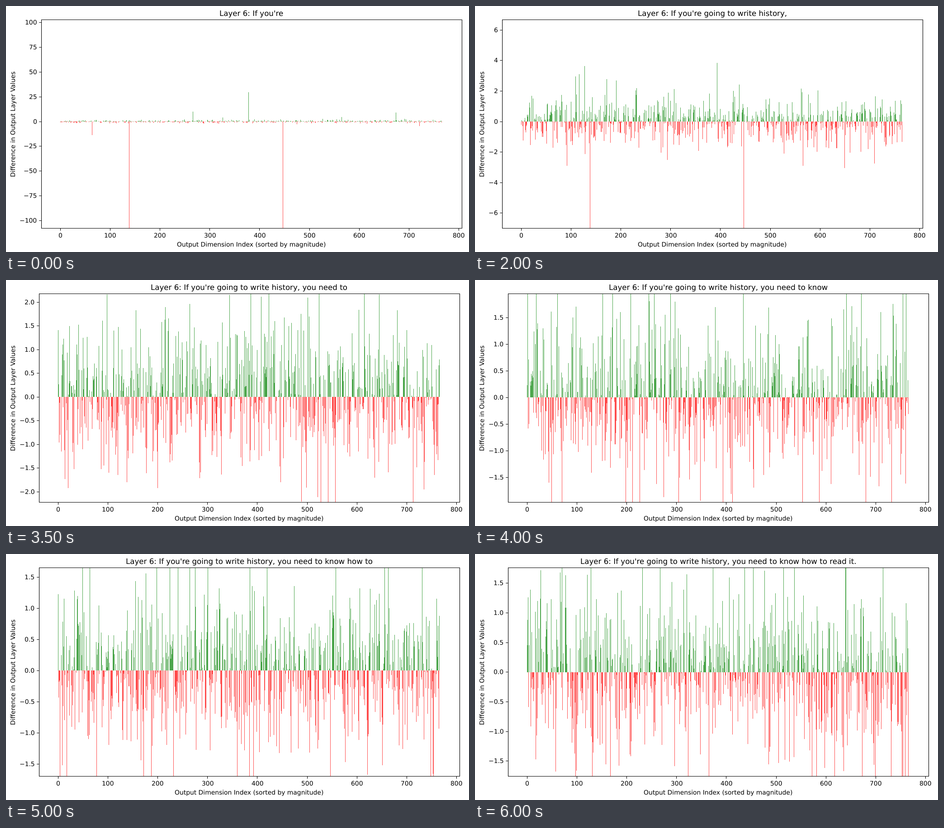
Animation of 1024x545 px, one loop 6500 ms. Source, as an HTML page:

```html
<!DOCTYPE html>
<html lang="en">
<head>
<meta charset="utf-8">
<title>Layer differences</title>
<style>
html, body { margin: 0; width: 100%; height: 100%; overflow: hidden; background: #fff; }
svg { display: block; }
text { font-family: "DejaVu Sans", sans-serif; fill: #000; text-rendering: geometricPrecision; }
.bars { shape-rendering: crispEdges; }
.axes { fill: none; stroke: #000; stroke-width: 1.11; }
</style>
</head>
<body>
<svg id="plot" width="1024" height="545" viewBox="0 0 1024 545"></svg>
<script>
const svg = document.getElementById('plot');
const TOP = 30, BOTTOM = 492, WIDTH = 930;
const COUNT = 768, UNIT = 1.1011, BAR = 0.4, OFF = 9999;
const SMALL = 13.889, LARGE = 16.667, STEP_MS = 500;
const GREEN = '#4ca64c', RED = '#ff4c4c', GREY = '#7b7b7b';

// Dimensions that stand out at first and halve with every word
const SPIKES = { 64: -13.5, 138: -230, 266: 10, 326: 4, 378: 29.5, 447: -230, 565: 4.5, 674: 9, 721: -4.5 };

const pen = document.createElement('canvas').getContext('2d');
pen.font = '1000px "DejaVu Sans", sans-serif';
const textWidth = (text, size) => pen.measureText(text).width * size / 1000;

function el(tag, attrs, parent) {
  const node = document.createElementNS('http://www.w3.org/2000/svg', tag);
  for (const key in attrs) node.setAttribute(key, attrs[key]);
  parent.appendChild(node);
  return node;
}

// Text starts on a whole pixel; align is 0.5 for centred, 1 for right
function label(parent, text, x, y, align = 0.5, size = SMALL) {
  const left = Math.round(x - textWidth(text, size) * align);
  el('text', { x: left, y, 'font-size': size }, parent).textContent = text;
}

function randomFrom(seed) {
  return () => {
    seed = (seed + 0x6D2B79F5) | 0;
    let r = Math.imul(seed ^ (seed >>> 15), 1 | seed);
    r = (r + Math.imul(r ^ (r >>> 7), 61 | r)) ^ r;
    return ((r ^ (r >>> 14)) >>> 0) / 4294967296;
  };
}

function makeValues(n, sigma, { peaks = {}, up = [], down = [] }) {
  const rnd = randomFrom(n * 97 + 11);
  const values = Array.from({ length: COUNT }, (_, i) => {
    const normal = Math.sqrt(-2 * Math.log(1 - rnd())) * Math.cos(2 * Math.PI * rnd());
    const noise = sigma * normal * (0.65 + 0.65 * rnd());
    const spike = (SPIKES[i] || 0) / 2 ** n;
    return Math.abs(spike) > Math.abs(noise) ? spike : noise;
  });
  Object.assign(values, peaks);
  up.forEach(i => values[i] = OFF);
  down.forEach(i => values[i] = -OFF);
  return values;
}

// Smallest round step giving at most nine intervals
function tickStep(range) {
  const power = 10 ** Math.floor(Math.log10(range / 9));
  return [1, 2, 2.5, 5, 10].map(m => m * power).find(step => range / step <= 9);
}

function yTicks(zero, scale) {
  const step = tickStep((BOTTOM - TOP) / scale), ticks = [];
  const first = Math.ceil((zero - BOTTOM) / scale / step);
  const last = Math.floor((zero - TOP) / scale / step);
  for (let n = first; n <= last; n++) {
    const size = Math.abs(n * step).toFixed(step < 1 ? 1 : 0);
    ticks.push({ y: Math.floor(zero - n * step * scale), text: (n < 0 ? '\u2212' : '') + size });
  }
  return ticks;
}

function drawBars(g, values, x0, zero, scale, lowColor) {
  const paths = {};
  const clampY = y => Math.max(TOP, Math.min(BOTTOM, Math.round(y)));
  const base = clampY(zero);
  values.forEach((v, i) => {
    // Edges snap to pixels, so some bars vanish
    const a = Math.round(x0 + UNIT * (i - BAR));
    const b = Math.round(x0 + UNIT * (i + BAR));
    const y = clampY(zero - v * scale);
    if (a === b || y === base) return;
    const color = v > 0 ? GREEN : y === BOTTOM ? lowColor : RED;
    paths[color] = (paths[color] || '') + `M${a} ${base}H${b}V${y}H${a}Z`;
  });
  for (const fill in paths) el('path', { class: 'bars', d: paths[fill], fill }, g);
}

const scenes = [];
let title = 'Layer 6: If';

function scene(word, zero, scale, extra = {}) {
  title += ' ' + word;
  const g = el('g', { display: 'none' }, svg);
  const ticks = yTicks(zero, scale);
  const left = Math.round(39.7 + Math.max(...ticks.map(t => textWidth(t.text, SMALL))));
  const x0 = left + 42.46, mid = left + WIDTH / 2;
  const sigma = Math.min(0.85, (BOTTOM - TOP) / 2 / scale / 2.5);

  drawBars(g, makeValues(scenes.length, sigma, extra), x0, zero, scale, extra.lowColor || RED);

  let lines = `M${left + 0.5} ${TOP + 0.5}h${WIDTH}V${BOTTOM + 0.5}h${-WIDTH}Z`;
  for (let v = 0; v <= 800; v += 100) {
    const x = x0 + v * UNIT;
    lines += `M${Math.floor(x) + 0.5} ${BOTTOM + 1}v4.8`;
    label(g, String(v), x, 513);
  }
  for (const { y, text } of ticks) {
    lines += `M${left} ${y + 0.5}h-4.8`;
    label(g, text, left - 9.6, y + 5, 1);
  }
  el('path', { class: 'axes', d: lines }, g);
  label(g, title, mid, 22, 0.5, LARGE);
  label(g, 'Output Dimension Index (sorted by magnitude)', mid, 533);
  scenes.push(g);
}

const side = el('g', { transform: 'translate(20 262) rotate(-90)' }, svg);
label(side, 'Difference in Output Layer Values', 0, 0);

scene("you're", 256, 2.195);
scene('going', 256, 4.39);
scene('to', 256, 8.8, { peaks: { 385: 3.6, 393: 4.4, 640: 4, 665: 3 }, lowColor: GREY });
scene('write', 256, 17.6);
scene('history,', 256, 33.83, {
  peaks: { 92: -2.9, 116: 3.1, 127: 3.65, 191: 2.7, 393: 3.85, 566: -2.9, 649: -3.05, 709: -2.75 }
});
scene('you', 256, 67.7);
scene('need', 257.6, 92.5, {
  up: [195, 260, 442, 616],
  down: [113, 127, 269, 336, 574, 649, 676, 710]
});
scene('to', 259, 105);
scene('know', 260.3, 117.8, {
  up: [1, 18, 152, 208, 288, 434, 641, 755],
  down: [49, 70, 212, 393, 553, 732]
});
scene('how', 259.5, 128);
scene('to', 258.3, 138.2, {
  up: [49, 198, 264, 301, 385, 558, 663, 731],
  down: [4, 77, 232, 360, 547, 748]
});
scene('read', 260, 135);
scene('it.', 261.8, 131.3, {
  up: [70, 232, 267, 373, 454, 515, 640],
  down: [97, 167, 323, 365, 572, 699, 755, 766]
});

let shown = -1;
function draw() {
  const now = Math.floor(performance.now() / STEP_MS) % scenes.length;
  if (now !== shown) {
    if (shown >= 0) scenes[shown].setAttribute('display', 'none');
    scenes[now].removeAttribute('display');
    shown = now;
  }
  requestAnimationFrame(draw);
}
draw();
</script>
</body>
</html>
```
